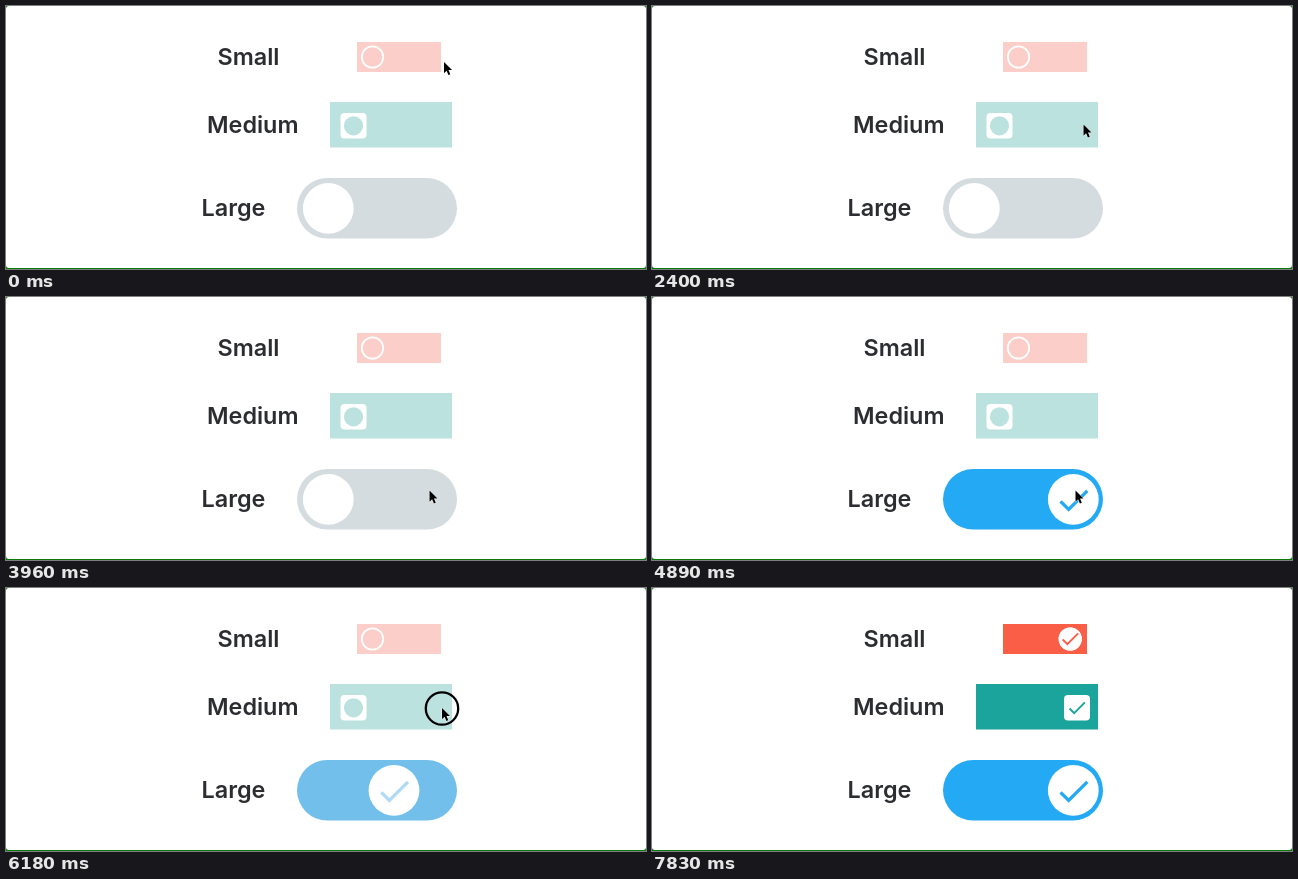
These frames come from a looping animation (640 px wide and 263 px high, 7.86 s). An HTML page:

```html
<!DOCTYPE html>
<html lang="en">
<head>
<meta charset="utf-8">
<title>Toggle sizes</title>
<style>
  html, body { margin: 0; width: 100%; height: 100%; overflow: hidden; background: #0a7a0a; }
  svg { display: block; width: 100%; height: 100%; }
  text { font: 600 23.4px Inter, "Open Sans", sans-serif; fill: #2b2d30; }
</style>
</head>
<body>
<svg viewBox="0 0 640 263">
  <defs>
    <polyline id="check" points="4.1,12.7 9,17.6 20.3,6.3" fill="none" stroke-width="2"/>
  </defs>
  <rect width="640" height="262" rx="3" fill="#fff"/>
  <text x="211.5" y="58.5">Small</text>
  <text x="201" y="126.5">Medium</text>
  <text x="195.5" y="210">Large</text>

  <g id="small">
    <rect class="track" x="351" y="36" width="84" height="30"/>
    <g class="thumb">
      <circle class="fill" cx="366.5" cy="51" r="11.5" fill="#fff"/>
      <circle cx="366.5" cy="51" r="10.7" fill="none" stroke="#fff" stroke-width="1.8"/>
      <use class="mark" href="#check" transform="translate(355.1 39.4) scale(.95)"/>
    </g>
  </g>

  <g id="medium">
    <rect class="track" x="324" y="96" width="122" height="45.5"/>
    <g class="thumb">
      <rect x="334.5" y="107" width="26" height="25.5" rx="4" fill="#fff"/>
      <circle class="hole" cx="347.5" cy="119.8" r="9.6"/>
      <use class="mark" href="#check" transform="translate(336.1 108.4) scale(.95)"/>
    </g>
  </g>

  <g id="large">
    <rect class="track" x="291" y="172" width="160" height="60.5" rx="30.25"/>
    <g class="thumb">
      <circle cx="322.3" cy="202.4" r="25.4" fill="#fff"/>
      <use class="mark" href="#check" transform="translate(302.8 183.4) scale(1.65)"/>
    </g>
  </g>

  <g id="cursor">
    <circle id="ring" cy=".5" r="16.2" fill="none" stroke="#000" stroke-width="2.3"/>
    <path d="M0 0V11.2L2.6 8.8L4.4 13L6.3 12.2L4.5 8.1H8Z"
          stroke="#fff" stroke-width="1" stroke-linejoin="round" paint-order="stroke"/>
  </g>
</svg>
<script>
const LOOP = 7860;
const SWITCH_TIME = 420;

// Each switch flips at the listed times, starting from off.
const toggles = [
  { id: "small", off: [251, 206, 201], on: [251, 94, 71], travel: 51.7, flips: [650, 1470, 7050] },
  { id: "medium", off: [187, 226, 223], on: [26, 164, 155], travel: 77.5, flips: [2400, 3330, 6480] },
  { id: "large", off: [213, 220, 224], on: [36, 169, 245], travel: 99, flips: [4290, 5070, 5945] }
];

// Cursor moves: start, end, x, y
const moves = [
  [0, 150, 428, 54],
  [300, 450, 428, 55],
  [1500, 1980, 431.5, 118.5],
  [3390, 3750, 423.5, 193.5],
  [5670, 5935, 436, 120],
  [6270, 6660, 428, 44],
  [6900, 7440, 556, 266]
];

// Click rings: start, end
const clicks = [
  [330, 430], [1230, 1260], [2040, 2100], [2970, 3030], [3900, 3960],
  [4830, 4880], [5640, 5700], [6150, 6210], [6720, 6780]
];

const clamp = v => Math.min(1, Math.max(0, v));
const mix = (a, b, p) => a + (b - a) * p;
const smooth = p => p * p * (3 - 2 * p);
const cubicInOut = p => p < .5 ? 4 * p ** 3 : 1 - 4 * (1 - p) ** 3;
const byId = id => document.getElementById(id);
const cursor = byId("cursor");
const ring = byId("ring");

for (const toggle of toggles) {
  const root = byId(toggle.id);
  for (const part of ["track", "thumb", "fill", "hole", "mark"])
    toggle[part] = root.querySelector("." + part);
}

function drawToggle(toggle, time) {
  const level = toggle.flips.reduce((sum, start, i) =>
    sum + (i % 2 ? -1 : 1) * clamp((time - start) / SWITCH_TIME), 0);
  const color = `rgb(${toggle.off.map((c, i) => Math.round(mix(c, toggle.on[i], level)))})`;
  toggle.track.setAttribute("fill", color);
  toggle.thumb.setAttribute("transform", `translate(${toggle.travel * cubicInOut(level)} 0)`);
  toggle.mark.setAttribute("stroke", color);
  toggle.mark.setAttribute("opacity", level);
  toggle.fill?.setAttribute("opacity", level);
  toggle.hole?.setAttribute("fill", color);
  toggle.hole?.setAttribute("opacity", 1 - level);
}

function drawCursor(time) {
  let x = 438, y = 56;
  for (const [start, end, toX, toY] of moves) {
    const p = smooth(clamp((time - start) / (end - start)));
    x = mix(x, toX, p);
    y = mix(y, toY, p);
  }
  const pressed = clicks.some(([start, end]) => time >= start && time < end);
  cursor.setAttribute("transform", `translate(${x} ${y})`);
  cursor.setAttribute("visibility", time < 7440 ? "visible" : "hidden");
  ring.setAttribute("opacity", pressed ? 1 : 0);
}

function draw(time) {
  toggles.forEach(toggle => drawToggle(toggle, time));
  drawCursor(time);
}

const began = performance.now();
function tick() {
  draw((performance.now() - began) % LOOP);
  requestAnimationFrame(tick);
}
draw(0);
requestAnimationFrame(tick);
</script>
</body>
</html>
```
